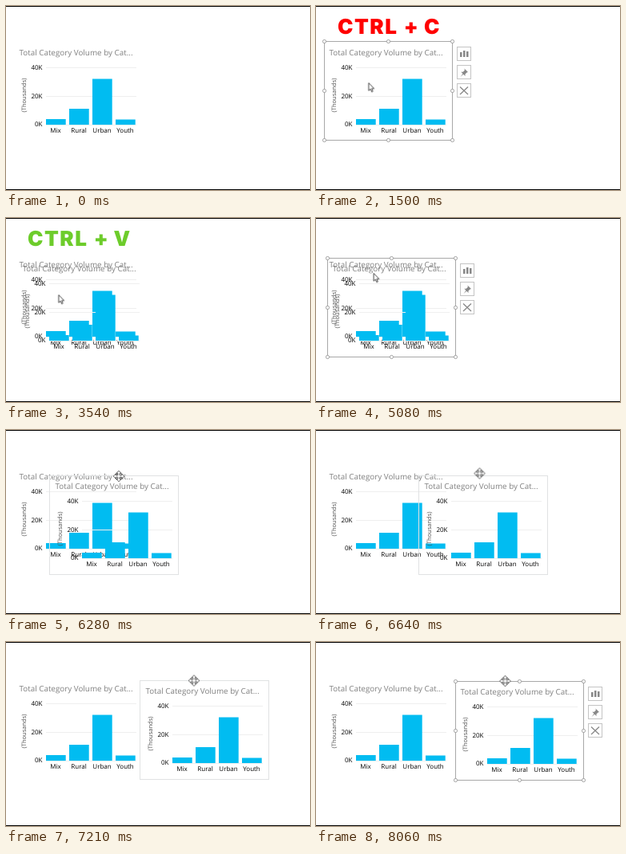
Write an HTML page that moves like this. It is 380x231 px and loops after 9090 ms.

```html
<!DOCTYPE html>
<html lang="en">
<head>
<meta charset="utf-8">
<title>Copy and paste a chart</title>
<style>
html, body { margin: 0; width: 100%; height: 100%; overflow: hidden; background: #fff; }
svg { display: block; width: 100vw; height: 100vh; font-family: "Open Sans", "Noto Sans", sans-serif; }

text { text-rendering: geometricPrecision; }
.title { font-size: 9.85px; fill: #808080; }
.label { font-size: 8px; font-weight: 500; fill: #000; }
.unit { font-size: 7.5px; fill: #505050; }
.middle { text-anchor: middle; }
.end { text-anchor: end; }
.bars { fill: #01bcf1; }
.grid { stroke: #efefef; }
.keys { font: 900 26px Inter, Roboto, sans-serif; letter-spacing: 1.5px; }
.red { fill: #f00; }
.green { fill: #6dcc2b; }
.frame { fill: none; stroke: #a8a8a8; }
.handles { fill: #fff; stroke: #999; stroke-width: .9; }
.button { fill: #fff; stroke: #c4c4c4; }
.glyph { fill: #888; }
.cross { fill: none; stroke: #888; stroke-width: 1.3; }
.ghost-frame { fill: none; stroke: #e0e2e3; }
.arrow { fill: #fff; stroke: #333; stroke-width: .9; }
.move { fill: #fff; stroke: #222; stroke-width: .75; }

/* every track shares one 9.09 s loop */
.track { animation: 9.09s linear infinite; }
.switch { animation-timing-function: step-end; }

.first-selection { animation-name: first-selection; }
@keyframes first-selection {
  0%, 31.9%, 100% { visibility: hidden; }
  11.88% { visibility: visible; }
}

.copy-keys { animation-name: copy-keys; }
@keyframes copy-keys {
  0%, 14.85% { opacity: 0; }
  16.5%, 31.57% { opacity: 1; }
  33.88%, 100% { opacity: 0; }
}

.paste-keys { animation-name: paste-keys; }
@keyframes paste-keys {
  0%, 31.57% { opacity: 0; }
  33.88%, 51.9% { opacity: 1; }
  54.23%, 100% { opacity: 0; }
}

.pasted { animation-name: pasted; }
@keyframes pasted {
  0%, 100% { visibility: hidden; }
  38.94% { visibility: visible; }
}

.drag { animation-name: drag; }
@keyframes drag {
  0% { transform: translate(4px, 6px); }
  66.77% { transform: translate(4px, 6px); animation-timing-function: steps(7); }
  69.08% { transform: translate(45px, 13px); animation-timing-function: steps(12); }
  73.04% { transform: translate(119px, 13px); animation-timing-function: steps(11); }
  76.67% { transform: translate(145px, 4px); animation-timing-function: steps(8); }
  79.31% { transform: translate(158px, 4px); animation-timing-function: steps(5); }
  80.96%, 100% { transform: translate(164px, 5px); }
}

.second-selection { animation-name: second-selection; }
@keyframes second-selection {
  0%, 66.77%, 100% { visibility: hidden; }
  45.76%, 88.66% { visibility: visible; }
}

.ghost { animation-name: ghost; }
@keyframes ghost {
  0%, 88.66%, 100% { visibility: hidden; }
  66.77% { visibility: visible; }
}

.arrow-shown { animation-name: arrow-shown; }
@keyframes arrow-shown {
  0%, 63.47%, 100% { visibility: hidden; }
  5.06% { visibility: visible; }
}

.arrow-path { animation-name: arrow-path; }
@keyframes arrow-path {
  0%, 5.06% { transform: translate(110px, 211px); animation-timing-function: ease-out; }
  9.35%, 15.18% { transform: translate(65.5px, 96.5px); }
  16.5%, 41.47% { transform: translate(65.8px, 96.5px); }
  44%, 45.76% { transform: translate(65.5px, 94.5px); }
  49.72%, 52.25% { transform: translate(66px, 100px); animation-timing-function: ease-in-out; }
  58.52%, 60.28% { transform: translate(75.5px, 52px); }
  61.71%, 100% { transform: translate(76px, 50px); }
}

.move-shown { animation-name: move-shown; }
@keyframes move-shown {
  0%, 100% { visibility: hidden; }
  63.47% { visibility: visible; }
}

.move-path { animation-name: move-path; }
@keyframes move-path {
  0% { transform: translate(76.5px, 50.5px); }
  66.77% { transform: translate(76.5px, 50.5px); animation-timing-function: steps(7); }
  69.08% { transform: translate(141px, 58px); animation-timing-function: steps(12); }
  73.04% { transform: translate(204.5px, 54.5px); animation-timing-function: steps(11); }
  76.67% { transform: translate(224px, 48.5px); animation-timing-function: steps(8); }
  79.31% { transform: translate(235px, 48.5px); animation-timing-function: steps(5); }
  80.96%, 100% { transform: translate(236.5px, 49px); }
}
</style>
</head>
<body>
<svg viewBox="0 0 380 231" preserveAspectRatio="none">
  <defs>
    <g id="chart">
      <text class="title" x="16.5" y="62">Total Category Volume by Cat...</text>
      <path class="grid" d="M50 77.5H163M50 113.5H163M50 149.5H163"/>
      <g class="label end">
        <text x="45.5" y="80">40K</text>
        <text x="45.5" y="115.5">20K</text>
        <text x="45.5" y="151">0K</text>
      </g>
      <text class="unit middle" transform="translate(25 112) rotate(-90)">(Thousands)</text>
      <path class="bars" d="M50 142h24.7v7H50zM79 129h24.7v20H79zM108 91.5h24.7V149H108zM137 142.5h24.7v6.5H137z"/>
      <g class="label middle">
        <text x="62" y="159">Mix</text>
        <text x="91" y="159">Rural</text>
        <text x="120" y="159">Urban</text>
        <text x="149" y="159">Youth</text>
      </g>
    </g>

    <circle id="handle" r="2.1"/>
    <rect id="button" class="button" x="176.5" width="17" height="17"/>

    <g id="selection">
      <rect class="frame" x="10.5" y="44.5" width="160" height="124"/>
      <g class="handles">
        <use href="#handle" x="10.5" y="44.5"/>
        <use href="#handle" x="90.5" y="44.5"/>
        <use href="#handle" x="170.5" y="44.5"/>
        <use href="#handle" x="10.5" y="106.5"/>
        <use href="#handle" x="170.5" y="106.5"/>
        <use href="#handle" x="10.5" y="168.5"/>
        <use href="#handle" x="90.5" y="168.5"/>
        <use href="#handle" x="170.5" y="168.5"/>
      </g>
      <use href="#button" y="51.5"/>
      <use href="#button" y="74.5"/>
      <use href="#button" y="97.5"/>
      <path class="glyph" d="M180 58h2.5v6H180zM184 56h2.5v8H184zM188 57h2.5v7H188z"/>
      <path class="glyph" d="M185.5 78.5l4.5 4.5-1.5.5-2 2 0 2.5-2.2-2.2-3.8 3.2 3-4-2.2-2.2 2.5 0 2-2z"/>
      <path class="cross" d="M180 101.5l10 9.5M190 101.5l-10 9.5"/>
    </g>
  </defs>

  <rect width="380" height="231" fill="#fff"/>

  <use href="#chart"/>
  <use class="track switch first-selection" href="#selection"/>

  <g class="track switch pasted">
    <g class="track drag">
      <use href="#chart" y="-1"/>
      <rect class="track switch ghost ghost-frame" x="9.5" y="44.5" width="161" height="124"/>
      <use class="track switch second-selection" href="#selection"/>
    </g>
  </g>

  <g class="keys">
    <g class="track copy-keys red">
      <text x="27" y="35">CTRL</text>
      <text class="middle" x="119.5" y="35">+</text>
      <text class="middle" x="145.5" y="35">C</text>
    </g>
    <g class="track paste-keys green">
      <text x="27" y="35">CTRL</text>
      <text class="middle" x="119.5" y="35">+</text>
      <text class="middle" x="145.5" y="35">V</text>
    </g>
  </g>

  <g class="track switch arrow-shown">
    <path class="track arrow-path arrow" d="M0 0V9.8L2.2 7.8 3.8 11.3 5.3 10.6 3.8 7.2H6.8Z"/>
  </g>
  <g class="track switch move-shown">
    <path class="track move-path move" d="M0-6.8L3.1-3.6H1.2V-1.2H3.6V-3.1L6.8 0 3.6 3.1V1.2H1.2V3.6H3.1L0 6.8-3.1 3.6H-1.2V1.2H-3.6V3.1L-6.8 0-3.6-3.1V-1.2H-1.2V-3.6H-3.1Z"/>
  </g>

  <path d="M0 0H380V1H0zM0 230H380V231H0z"/>
</svg>
</body>
</html>
```
